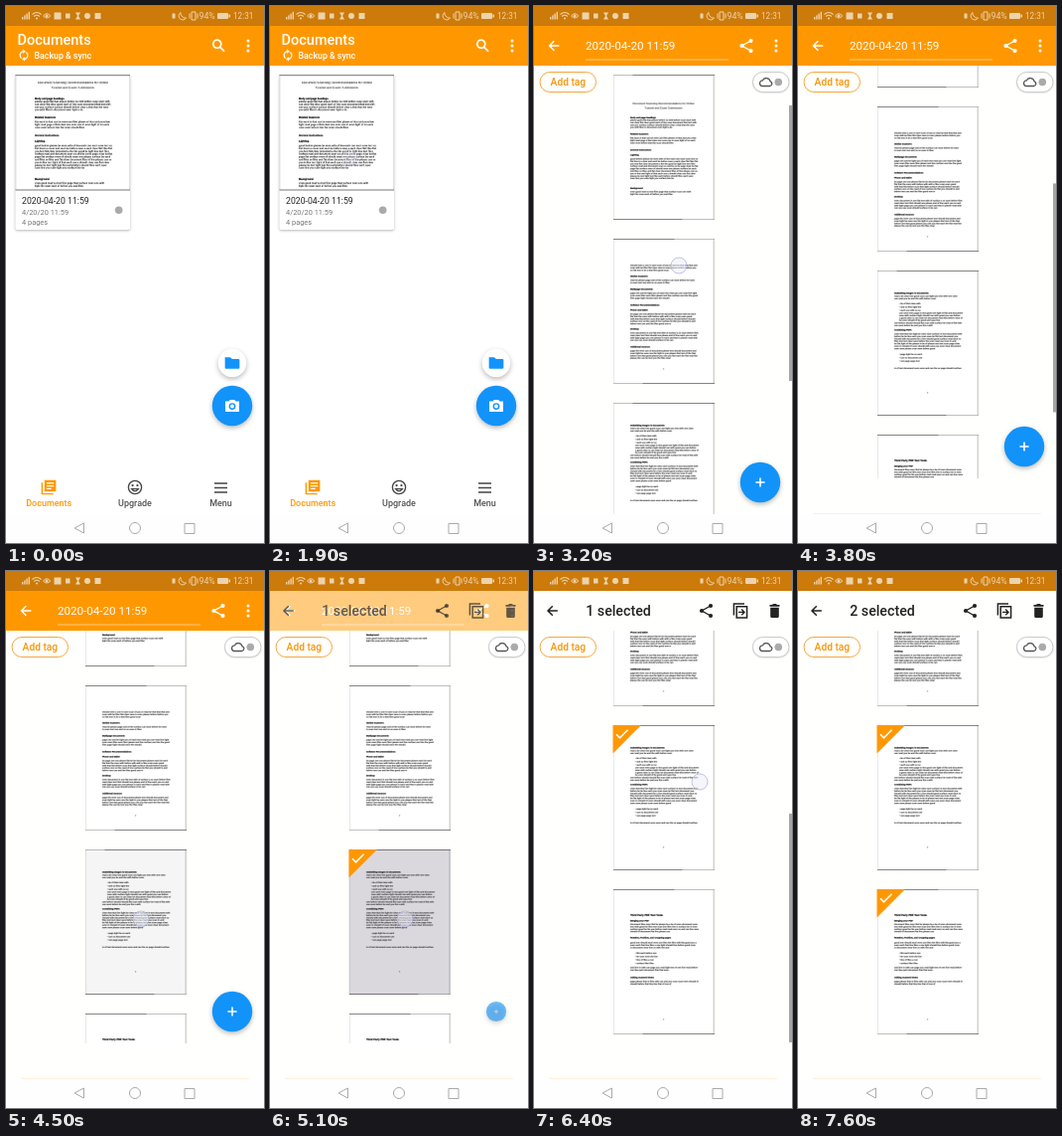
These frames come from a looping animation (260x540 px, 8 s). An HTML page with a canvas:

```html
<!DOCTYPE html>
<html lang="en">
<head>
<meta charset="utf-8">
<title>Document scanner</title>
<style>
html, body { margin: 0; width: 100%; height: 100%; overflow: hidden; background: #fff; }
canvas { display: block; width: 260px; height: 540px; }
</style>
</head>
<body>
<canvas id="stage"></canvas>
<script>
const W = 260, H = 540, LOOP = 8000, STEP = 100;
const ORANGE = '#ff9800', BLUE = '#1293fa', INK = '#222', PAPER = '#fffffd';
const canvas = document.getElementById('stage');
const dpr = window.devicePixelRatio || 1;
canvas.width = W * dpr;
canvas.height = H * dpr;
const stage = canvas.getContext('2d');
let g = stage;

const clamp = v => Math.max(0, Math.min(1, v));
const ramp = (t, a, b) => clamp((t - a) / (b - a));
const smooth = v => v * v * (3 - 2 * v);
const ease = (t, a, b) => smooth(ramp(t, a, b));
const pulse = (t, a, b, c, d) => Math.min(ramp(t, a, b), 1 - ramp(t, c, d));

// Drawing helpers
function group(alpha, draw) {
  if (alpha <= 0) return;
  g.save();
  g.globalAlpha *= alpha;
  draw();
  g.restore();
}
function at(x, y, draw, scale = 1) {
  g.save();
  g.translate(x, y);
  g.scale(scale, scale);
  draw();
  g.restore();
}
function rect(x, y, w, h, color) {
  g.fillStyle = color;
  g.fillRect(x, y, w, h);
}
function round(x, y, w, h, r) {
  g.beginPath();
  g.roundRect(x, y, w, h, r);
}
function dot(x, y, r, color) {
  g.fillStyle = color;
  g.beginPath();
  g.arc(x, y, r, 0, 7);
  g.fill();
}
function stroke(path, color, width = 1.5) {
  g.strokeStyle = color;
  g.lineWidth = width;
  g.stroke(new Path2D(path));
}
function fill(path, color) {
  g.fillStyle = color;
  g.fill(new Path2D(path), 'evenodd');
}
function font(size, weight = 400, family = 'Roboto') {
  g.font = `${weight} ${size}px ${family}, sans-serif`;
}
function text(s, x, y, size, color, weight = 400, align = 'left') {
  font(size, weight);
  g.textAlign = align;
  g.fillStyle = color;
  g.fillText(s, x, y);
}
function shadow(blur, y, draw) {
  g.save();
  g.shadowColor = 'rgba(0,0,0,.28)';
  g.shadowBlur = blur * dpr;
  g.shadowOffsetY = y * dpr;
  draw();
  g.restore();
}

// Scanned pages: t = title, h = heading, p = paragraph, b = bullets, n = page number
const layouts = [
  [['t', 29.5, 'Document Scanning Recommendations for Online'], ['t', 34, 'Tutorial and Exam Submission'],
   ['h', 43.5, 'Body and page headings'], ['p', 46, 4], ['h', 60, 'Related Scanners'], ['p', 64, 3],
   ['h', 76, 'General Instructions'], ['h', 81, 'Lighting'], ['p', 85, 9], ['h', 114.5, 'Background'], ['p', 118, 2]],
  [['p', 27, 3], ['h', 38, 'Similar Scanners'], ['p', 42, 2], ['h', 51, 'Multipage Documents'], ['p', 55, 3],
   ['h', 67, 'Software Recommendations'], ['h', 72, 'Phone and tablet'], ['p', 76, 5], ['h', 91, 'Desktop'],
   ['p', 95, 4], ['h', 109, 'Additional Sources'], ['p', 113, 4], ['n', 131, '2']],
  [['h', 23, 'Submitting Images in Documents'], ['p', 26, 2], ['b', 33.5, 3], ['p', 43, 4, 5], ['p', 53, 2],
   ['h', 60, 'Combining PDFs'], ['p', 64, 7], ['b', 84.5, 3], ['p', 98.5, 1], ['n', 123, '3']],
  [['h', 26.5, 'Third Party PDF Test Tools', 2.6], ['h', 32, 'Merging your PDF'], ['p', 35.5, 4],
   ['h', 49, 'Rotation, Position, and Cropping pages'], ['p', 54, 3], ['b', 64.5, 4], ['p', 79, 2],
   ['h', 89, 'Adding Scanned Notes'], ['p', 93, 2], ['n', 131, '4']]
];
const words = ('the scan page should be clear and even so that each line of text can be read ' +
  'please use a flat surface with good light before you save files in one document').split(' ');
let seed = 7;
function word() {
  seed = (seed * 16807) % 2147483647;
  return words[seed % words.length];
}
function line(width) {
  let s = word();
  for (;;) {
    const next = s + ' ' + word();
    if (g.measureText(next).width > width) return s;
    s = next;
  }
}
function print(s, x, y, size, weight, align = 'left') {
  font(size, weight, 'Liberation Sans');
  g.textAlign = align;
  g.fillStyle = '#000';
  g.fillText(s, x, y);
}
function printItem([kind, y, arg, extra]) {
  if (kind === 't') return print(arg, 50.5, y, 2.8, 400, 'center');
  if (kind === 'n') return print(arg, 50.5, y, 2.2, 400, 'center');
  if (kind === 'h') {
    print(arg, 17, y, extra || 2.2, 700);
    g.strokeStyle = '#000';
    g.lineWidth = 0.12;
    return g.strokeText(arg, 17, y);
  }
  const bullet = kind === 'b';
  const indent = bullet ? 5 : extra || 0;
  for (let i = 0; i < arg; i++) {
    font(2.15, 700, 'Liberation Sans');
    const s = line(bullet ? 22 : i && i === arg - 1 ? 44 : 69 - indent);
    print((bullet ? '• ' : '') + s, 17 + indent, y + i * (bullet ? 3.4 : 2.45), 2.15, 700);
  }
}

// Pages are printed large once, then scaled down so the tiny type stays smooth
const PRINT = 4 * dpr;
const pages = layouts.map((items, i) => {
  const sheet = document.createElement('canvas');
  sheet.width = 102 * PRINT;
  sheet.height = 146 * PRINT;
  g = sheet.getContext('2d');
  g.scale(PRINT, PRINT);
  rect(0, 0, 102, 146, '#fff');
  stroke('M.5 0V146M101.5 0V146', '#c0c0c0', 0.7);
  stroke('M0 .5H102M0 145.5H102', '#aaa', 0.7);
  stroke(i % 2 ? 'M0 .5H62M30 145.5H102' : 'M20 .5H102M0 145.5H70', '#555', 0.6);
  g.translate(0.5, 0.5);
  items.forEach(printItem);
  return sheet;
});
g = stage;

function drawPage(i) {
  g.imageSmoothingQuality = 'high';
  g.drawImage(pages[i], -0.5, -0.5, 102, 146);
}

// Icons, centred on the origin
const icons = {
  back: c => stroke('M5 0H-4.6M0 -4.8L-4.8 0L0 4.8', c, 1.5),
  share(c) {
    stroke('M4.5 -5L-4.5 0L4.5 5', c, 1.4);
    dot(4.5, -5, 2.1, c); dot(-4.5, 0, 2.1, c); dot(4.5, 5, 2.1, c);
  },
  more: c => [-5, 0, 5].forEach(y => dot(0, y, 1.5, c)),
  search: c => stroke('M2.8 -1.8A4 4 0 1 1 -5.2 -1.8A4 4 0 1 1 2.8 -1.8M1.6 1.2L6 5.6', c, 1.7),
  copy(c) {
    stroke('M-3.8 -4.2H6.6V7H-3.8ZM-6.6 4.5V-7H4', c, 1.5);
    stroke('M-2 1.4H3.6M1.2 -1.4L4 1.4L1.2 4.2', c, 1.4);
  },
  trash: c => fill('M-5 -6H-2.5L-1.5 -7H1.5L2.5 -6H5V-4.3H-5ZM-4.3 -3.3H4.3V5.5Q4.3 7 2.8 7H-2.8Q-4.3 7 -4.3 5.5Z', c),
  sync(c) {
    stroke('M-2.5 3A4 4 0 0 1 -1 -3.9M2.5 -3A4 4 0 0 1 1 3.9', c, 1.2);
    fill('M-1 -6L2 -3.8L-1 -1.7ZM1 6L-2 3.8L1 1.7Z', c);
  },
  plus: c => stroke('M-4.6 0H4.6M0 -4.6V4.6', c, 1.6),
  folder: c => fill('M-7 -5.5H-2L0 -3.7H6Q7 -3.7 7 -2.7V4.5Q7 5.5 6 5.5H-6Q-7 5.5 -7 4.5Z', c),
  camera(c) {
    fill('M-7 -4.5H-3.5L-2.2 -6H2.2L3.5 -4.5H7V6H-7ZM3.4 .6A3.4 3.4 0 1 0 -3.4 .6A3.4 3.4 0 1 0 3.4 .6Z', c);
    dot(0, 0.6, 2, c);
  },
  library(c) {
    fill('M-4 -7H7V4H-4ZM-2 -4.6V-3.4H5V-4.6ZM-2 -2V-.8H5V-2ZM-2 .6V1.8H2.5V.6Z', c);
    stroke('M-6.3 -4.5V6.3H4.5', c, 1.4);
  },
  smile(c) {
    stroke('M6.3 0A6.3 6.3 0 1 1 -6.3 0A6.3 6.3 0 1 1 6.3 0M-3.2 1.5Q0 6 3.2 1.5Z', c, 1.3);
    dot(-2.3, -1.8, 1.1, c); dot(2.3, -1.8, 1.1, c);
  },
  menu: c => stroke('M-6.5 -4.5H6.5M-6.5 0H6.5M-6.5 4.5H6.5', c, 1.5),
  cloud: c => stroke('M-3.6 4H3.6A2.5 2.5 0 0 0 4 -.9A4.1 4.1 0 0 0 -3.7 -1.6A2.8 2.8 0 0 0 -3.6 4Z', c, 1.3)
};
const icon = (name, x, y, color, scale) => at(x, y, () => icons[name](color), scale);

function fab(x, y, r, color, name, iconColor, iconScale = 1) {
  shadow(5, 2, () => dot(x, y, r, color));
  icon(name, x, y, iconColor, iconScale);
}

function statusBar() {
  const c = '#eed3aa';
  rect(0, 0, W, 20, '#cc7a0a');
  for (let i = 0; i < 4; i++) rect(16 + i * 2.2, 11 - i * 1.7, 1.4, 2.5 + i * 1.7, c);
  stroke('M26.5 8.5Q31 4.5 35.5 8.5M28.2 10.5Q31 8 33.8 10.5', c, 1.1);
  dot(31, 12.5, 1, c);
  stroke('M37.5 10Q41 5.5 44.8 10Q41 14 37.5 10Z', c, 1);
  dot(41, 10, 1.5, c);
  rect(48.5, 6.5, 7, 7, c);
  rect(60, 7.5, 4.5, 5, c);
  fill('M70 6.5H75L73 10L75 13.5H70L72 10Z', c);
  dot(82, 10, 3, c);
  rect(89.5, 7, 6, 6, c);
  rect(167.5, 7.5, 3, 5, c);
  stroke('M176 6.5A4 4 0 1 0 181.5 12A5 5 0 0 1 176 6.5Z', c, 1);
  stroke('M187 6H191V14H187ZM185 7.5V12.5M193 7.5V12.5', c, 1);
  text('94%', 194.5, 13, 8.7, c);
  round(213, 7, 11, 6, 1);
  g.fillStyle = c;
  g.fill();
  rect(224.5, 8.5, 1.5, 3, c);
  text('12:31', 229, 13, 8.2, c);
}

function systemNav() {
  rect(0, 511, W, 29, '#fefefe');
  stroke('M69 525L78.5 520V530ZM135.5 525A5.5 5.5 0 1 1 124.5 525A5.5 5.5 0 1 1 135.5 525M180 520.5H190V530.5H180Z', '#aaa', 1);
}

function listScreen() {
  rect(0, 19, W, 492, '#fff');
  rect(0, 19, W, 41, ORANGE);
  text('Documents', 11.5, 39, 14.5, '#fff', 500);
  icon('sync', 18, 49.5, '#fff');
  text('Backup & sync', 28.5, 53, 8.8, '#fff', 500);
  icon('search', 214, 40, '#fff');
  icon('more', 244, 40, '#fff');

  shadow(3, 1, () => { round(9.5, 69, 115.5, 156, 2); g.fillStyle = '#fff'; g.fill(); });
  g.save();
  g.beginPath();
  g.rect(9.5, 69, 115.5, 116);
  g.clip();
  at(9.8, 44.4, () => drawPage(0), 1.14);
  g.restore();
  stroke('M9.5 69.7H125M9.5 185H125', '#555', 0.8);
  text('2020-04-20 11:59', 16, 199, 8.7, INK);
  text('4/20/20 11:59', 16, 209.5, 7.4, '#777');
  text('4 pages', 16, 219.5, 7.4, '#777');
  dot(113.7, 205.3, 3.8, '#aaa');

  fab(228, 359, 14.3, '#fff', 'folder', BLUE, 1.05);
  fab(228, 402, 20.2, BLUE, 'camera', '#fff');
  icon('library', 43, 484, ORANGE, 1.05);
  icon('smile', 130, 484, '#444', 1.05);
  icon('menu', 216.5, 484.5, '#444');
  text('Documents', 43.2, 503, 9, ORANGE, 500, 'center');
  text('Upgrade', 130, 503, 9, '#555', 500, 'center');
  text('Menu', 216.5, 503, 9, '#555', 500, 'center');
}

const scrollAt = t => 133 * ease(t, 3200, 3800) - 14 * ease(t, 3850, 4200) + 125 * ease(t, 5900, 6400);

function pageTile(i, y, pressed, selected) {
  at(80, y + 0.5, () => {
    drawPage(i);
    group(pressed, () => rect(-0.5, -0.5, 102, 146, 'rgba(70,62,82,.2)'));
    group(selected, () => {
      fill('M-.5 -.5H28L-.5 28Z', ORANGE);
      stroke('M3 8.7L6.5 12.3L14.5 4.3', '#fff', 1.6);
    });
  });
}

function pageScreen(t) {
  const scroll = scrollAt(t);
  const bar = ease(t, 3200, 3600);
  const bottom = 511 - 36 * bar;
  rect(0, 19, W, 492, PAPER);
  g.save();
  g.beginPath();
  g.rect(0, 60, W, bottom - 60);
  g.clip();
  for (let i = 0; i < 4; i++) {
    const y = 69 + 165 * i - scroll;
    if (y > bottom || y < -90) continue;
    const pressed = i === 2 ? pulse(t, 4400, 4800, 5200, 5700) : i === 3 ? pulse(t, 6800, 7000, 7200, 7600) : 0;
    const selected = i === 2 ? ramp(t, 4800, 5000) : i === 3 ? ramp(t, 6900, 7200) : 0;
    pageTile(i, y, pressed, selected);
  }
  const thumb = Math.max(pulse(t, 2300, 2600, 3950, 4250), pulse(t, 5800, 6000, 6800, 7200));
  group(thumb, () => rect(257, 100 + 0.59 * scroll, 3, 277 - 47 * bar, '#a6a6a6'));
  g.restore();

  round(6, 66.5, 56.5, 20, 10);
  g.fillStyle = PAPER;
  g.fill();
  g.strokeStyle = '#f5a63c';
  g.lineWidth = 1;
  g.stroke();
  text('Add tag', 16.6, 80.2, 10.2, '#f5960f', 500);
  shadow(2, 0.5, () => { round(220.5, 66.5, 36.5, 20, 10); g.fillStyle = '#fff'; g.fill(); });
  g.strokeStyle = '#ccc';
  g.stroke();
  icon('cloud', 234, 76.5, '#555');
  dot(246.3, 76.5, 3.8, '#aaa');

  const size = 1 - ramp(t, 4900, 5300);
  if (size > 0) group(0.2 + 0.8 * size, () => fab(228, 479 - 36 * bar, 20.2 * size, BLUE, 'plus', '#fff', size));
  toolbar(t);
}

function toolbar(t) {
  const mode = ramp(t, 5000, 5200);
  rect(0, 19, W, 41, ORANGE);
  icon('back', 20.3, 40, '#fff');
  text('2020-04-20 11:59', 52, 44, 11.6, '#fff');
  rect(52, 53.5, 144, 1, 'rgba(255,255,255,.5)');
  icon('share', 214, 40, '#fff');
  icon('more', 244, 40, '#fff');
  group(mode, () => rect(0, 19, W, 41, PAPER));
  group(clamp(mode * 1.4), () => {
    icon('back', 18.8, 40, INK);
    text(t < 7000 ? '1 selected' : '2 selected', 52.2, 45, 14.2, INK, 500);
    icon('share', 173.5, 40, INK);
    icon('copy', 208, 40, INK);
    icon('trash', 242.5, 40, INK);
  });
}

function touch(x, y, alpha) {
  group(alpha, () => {
    dot(x, y, 8, 'rgba(236,236,248,.5)');
    g.strokeStyle = 'rgba(165,165,220,.65)';
    g.lineWidth = 1;
    g.stroke();
  });
}

function touches(t) {
  touch(80, 152, pulse(t, 1800, 2050, 2150, 2400));
  touch(146, 261 - scrollAt(Math.min(t, 3800)), pulse(t, 2950, 3150, 3500, 3800));
  touch(136, 350, pulse(t, 4300, 4500, 5150, 5400));
  const drag = ease(t, 5900, 6400);
  touch(150 + 17 * drag, 337 - 125 * drag, pulse(t, 5800, 6000, 6400, 6700));
  touch(137, 392, pulse(t, 6700, 6900, 7050, 7300));
}

function render(t) {
  g.setTransform(dpr, 0, 0, dpr, 0, 0);
  const opened = ease(t, 2200, 2650);
  if (opened < 1) listScreen();
  group(opened, () => at(0, 24 * (1 - opened), () => pageScreen(t)));
  touches(t);
  statusBar();
  systemNav();
  group(ease(t, 3200, 3600), () => rect(15, 510, 230, 1, '#fff0dc'));
}

const start = performance.now();
function frame() {
  const t = (performance.now() - start) % LOOP;
  render(Math.floor(t / STEP) * STEP);
  requestAnimationFrame(frame);
}
frame();
</script>
</body>
</html>
```
